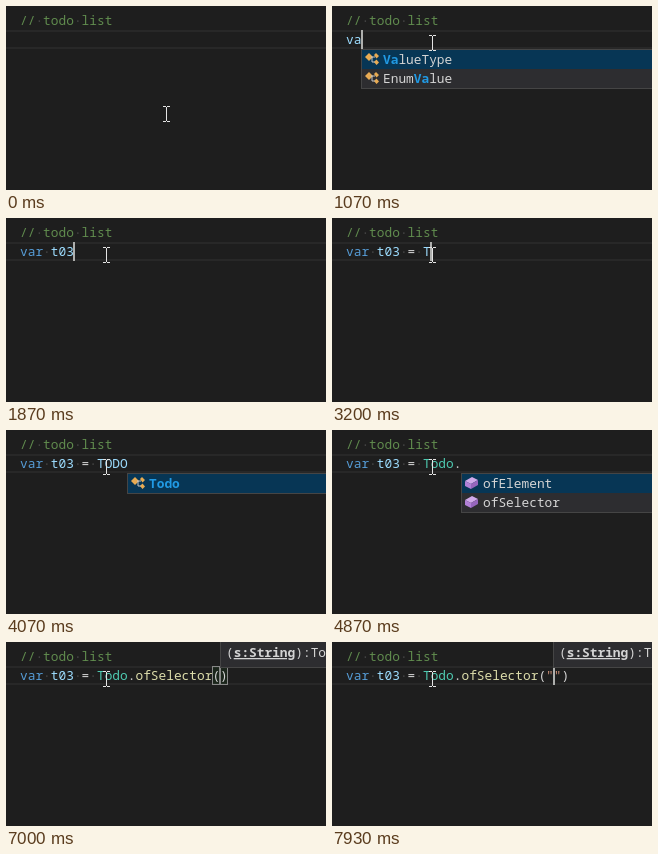
Recreate the animation shown at these times as an HTML page. Size 320 px wide and 184 px high, loop 8 s.

```html
<!DOCTYPE html>
<html lang="en">
<head>
<meta charset="utf-8">
<title>Editor autocompletion</title>
<style>
html, body { margin: 0; width: 100%; height: 100%; overflow: hidden; background: #1e1e1e; }
svg { display: block; width: 100vw; height: 100vh; }
text { font: 12.83px "Noto Sans Mono", "DejaVu Sans Mono", monospace; white-space: pre; }
</style>
</head>
<body>
<svg id="stage" viewBox="0 0 320 184"></svg>
<script>
const LOOP = 8000, LEFT = 14, CHAR = 7.697, LINE = 19;
const stage = document.getElementById('stage');

const color = {
  comment: '#608b4e', keyword: '#569cd6', name: '#9cdcfe', type: '#4ec9b0',
  call: '#dcdcaa', string: '#ce9178', plain: '#d4d4d4', match: '#219ae4',
  panel: '#2d2d30', border: '#454545', selected: '#073655'
};

// [time, line text, caret distance from the end]
const edits = [
  [-530, ''], [870, 'v'], [1000, 'va'], [1130, 'var'], [1330, 'var '],
  [1530, 'var t'], [1730, 'var t0'], [1870, 'var t03'], [2130, 'var t03 '],
  [2330, 'var t03 ='], [2530, 'var t03 = '], [3200, 'var t03 = T'],
  [3330, 'var t03 = TO'], [3470, 'var t03 = TOD'], [3600, 'var t03 = TODO'],
  [4130, 'var t03 = Todo'], [4400, 'var t03 = Todo.'],
  [5930, 'var t03 = Todo.ofSelector'],
  [6530, 'var t03 = Todo.ofSelector()', 1],
  [7470, 'var t03 = Todo.ofSelector("")', 2]
];

// Suggestions as "kind:label"
const values = ['class:ValueType', 'class:EnumValue'];
const all = ['field:t', 'field:t01', 'field:t02', 'module:test', 'word:true',
  'class:Tick', 'class:Todo', 'class:Trace'];
const todos = ['class:Todo', 'class:Token', 'class:AutoTool'];
const members = ['method:ofElement', 'method:ofSelector'];

// [from, to, column, typed prefix, rows, selected row]
const popups = [
  [930, 1070, 1, 'v', values, 0], [1070, 1200, 2, 'va', values, 0],
  [1600, 1800, 5, 't', all, 0], [1800, 1870, 6, 't0', all.slice(1, 3), 0],
  [3330, 3530, 12, 'to', todos, 0], [3530, 3670, 13, 'tod', todos.slice(0, 1), 0],
  [3670, 4130, 14, 'todo', todos.slice(0, 1), 0],
  [4470, 5670, 15, '', members, 0], [5670, 5930, 15, '', members, 1]
];

const pointer = [
  [0, 160, 108], [70, 146, 92], [130, 124, 66], [200, 109, 48],
  [270, 104, 42], [530, 102, 39], [600, 100, 37]
];

const latest = (list, t) => list.filter(item => item[0] <= t).pop();
const colX = col => LEFT + col * CHAR;
const rect = (x, y, w, h, fill, extra = '') =>
  `<rect x="${x}" y="${y}" width="${w}" height="${h}" fill="${fill}" ${extra}/>`;
const path = (d, fill) => `<path d="${d}" fill="${fill}"/>`;
const label = (x, y, str, fill, extra = '') =>
  `<text x="${x.toFixed(2)}" y="${y}" fill="${fill}" ${extra}>${str}</text>`;

function tokenColor(token, next) {
  if (token.startsWith('//')) return color.comment;
  if (token === 'var') return color.keyword;
  if (token[0] === '"') return color.string;
  if (!/\w/.test(token)) return color.plain;
  if (next === '(') return color.call;
  return /^[A-Z]\w*[a-z]/.test(token) ? color.type : color.name;
}

function codeLine(str, y, fill) {
  let out = '';
  for (const m of str.matchAll(/ |\/\/|\w+|"+|[^\s\w"]/g)) {
    const x = colX(m.index);
    out += m[0] === ' '
      ? label(x, y, '·', '#e3e4e2', 'opacity=".2"')
      : label(x, y, m[0], fill || tokenColor(m[0], str[m.index + m[0].length]));
  }
  return out;
}

function cube(top, left, right) {
  return path('M0 4L7 0L13 3L6 7Z', top) + path('M0 4L6 7V12L0 9Z', left) +
    path('M6 7L13 3V8L6 12Z', right);
}

const icons = {
  class: path('M0 4L4 0L8 4L4 8Z M9 2L11 0L14 3L11.500 5.500Z M9 9L11.500 6.500L14 9.500L11.500 12Z', '#e8ab53') +
    '<path d="M6 4H10M7 4V9H10" fill="none" stroke="#c5c5c5"/>',
  field: cube('#a5d6ff', '#75beff', '#59a8e8'),
  method: cube('#d0a9ea', '#b180d7', '#9666bd'),
  module: label(-1, 10, '{}', '#c5c5c5'),
  word: path('M0 1H5V3H0Z M7 1H13V2H7Z M0 5H8V6H0Z M10 4H13V6H10Z M0 8H4V10H0Z M6 8H13V9H6Z M0 11H9V12H0Z', '#a0a0a0')
};

function suggestion(row, x, y, typed) {
  const [kind, str] = row.split(':');
  const at = str.toLowerCase().indexOf(typed);
  const parts = [str.slice(0, at), str.slice(at, at + typed.length), str.slice(at + typed.length)];
  let out = `<g transform="translate(${x + 4} ${y + 3})">${icons[kind]}</g>`;
  let tx = x + 22;
  parts.forEach((part, i) => {
    if (part) out += label(tx, y + 14, part, i === 1 ? color.match : color.plain,
      i === 1 ? 'font-weight="600" style="font-weight:600"' : '');
    tx += part.length * CHAR;
  });
  return out;
}

function popup([, , col, typed, rows, sel]) {
  const x = Math.floor(colX(col)), h = rows.length * LINE;
  return rect(x + .5, 43.5, 430, h + 1, color.panel, `stroke="${color.border}"`) +
    rect(x + 1, 44 + sel * LINE, 429, LINE, color.selected) +
    rows.map((row, i) => suggestion(row, x, 44 + i * LINE, typed)).join('');
}

function hint(col) {
  const x = Math.floor(colX(col)), tx = x + 6;
  return rect(x + .5, -4.5, 200, 30, color.panel, `stroke="${color.border}"`) +
    label(tx, 15, '(', color.plain) +
    label(tx + CHAR, 15, 's:String', color.plain,
      'style="font-weight:700;text-decoration:underline"') +
    label(tx + 9 * CHAR, 15, '):Todo', color.plain);
}

function bracketBox(col) {
  return rect(Math.round(colX(col)) + .5, 24.5, 7, 18, 'rgba(0,100,0,.1)', 'stroke="#888"');
}

function beam([, x, y]) {
  return `<path d="M${x - 3} ${y - 7.500}h3m1 0h3M${x + .5} ${y - 7}v14M${x - 3} ${y + 7.500}h3m1 0h3"
    fill="none" stroke="#e4e4e4"/>`;
}

function scene(t) {
  const [time, str, back = 0] = latest(edits, t);
  const caretOn = Math.floor((t - time + 60) / 530) % 2 === 0;
  const open = popups.find(p => t >= p[0] && t < p[1]);
  let out = rect(0, 0, 320, 184, '#1e1e1e') +
    rect(0, 24, 320, 2, '#282828') + rect(0, 41, 320, 2, '#282828') +
    codeLine('// todo list', 19, color.comment);
  if (t >= 6600 && t < 7470) out += bracketBox(25) + bracketBox(26);
  out += codeLine(str, 38);
  if (caretOn) out += rect(Math.floor(colX(str.length - back) + .1), 24, 2, 19, '#aeafad');
  if (open) out += popup(open);
  if (t >= 6730) out += hint(t < 7530 ? 26 : 27);
  return out + beam(latest(pointer, t));
}

let shown = '';
function tick() {
  const next = scene(performance.now() % LOOP);
  if (next !== shown) stage.innerHTML = shown = next;
  requestAnimationFrame(tick);
}
tick();
</script>
</body>
</html>
```
